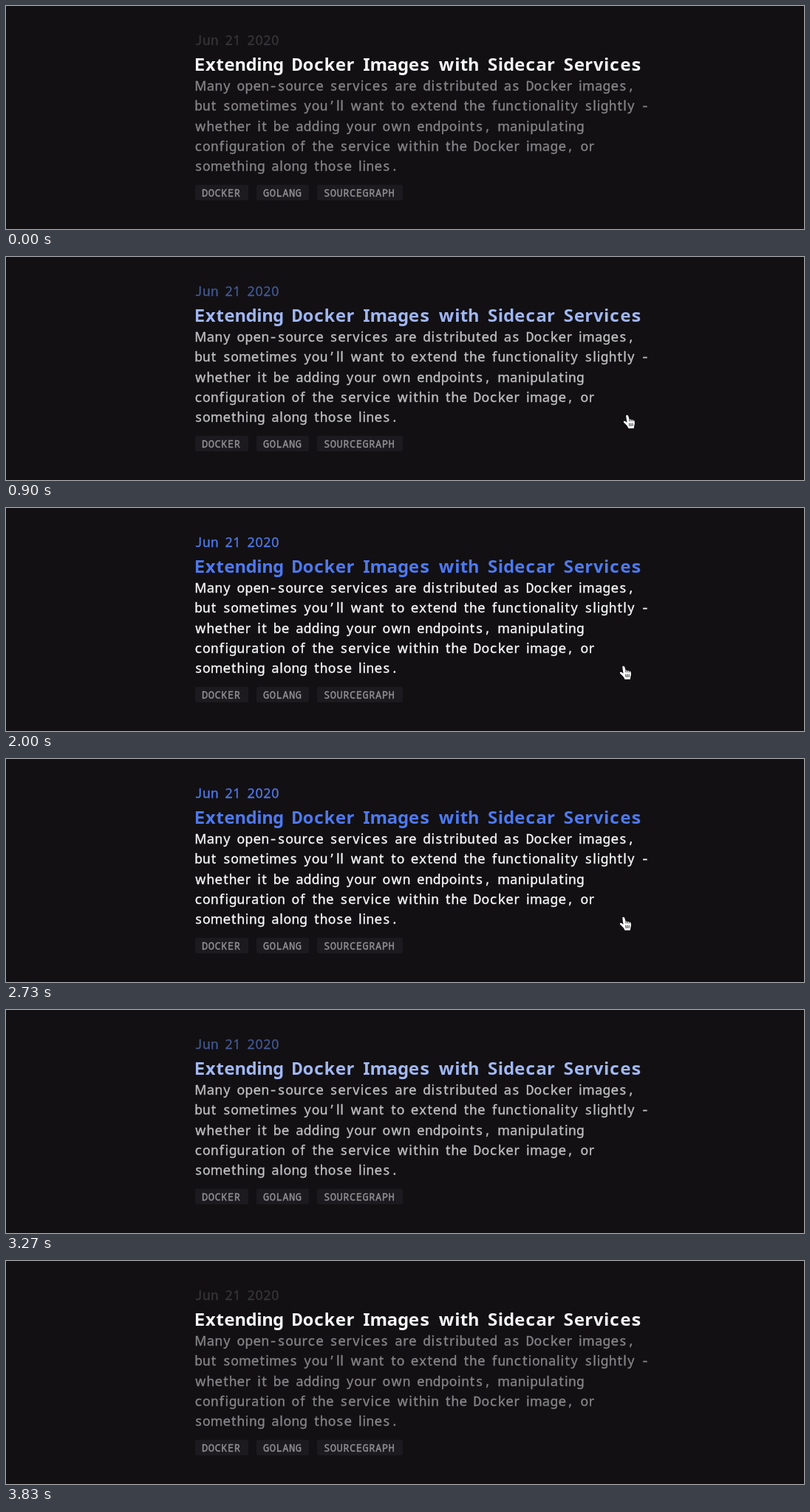
Write an HTML page that moves like this. It is 1080 by 303 pixels and loops after 4130 ms.

```html
<!DOCTYPE html>
<html lang="en">
<head>
<meta charset="utf-8">
<title>Post card hover</title>
<style>
html, body { margin: 0; width: 100%; height: 100%; overflow: hidden; background: #121013; }
svg { display: block; width: 100vw; height: 100vh; }
text { white-space: pre; text-anchor: middle; font-family: "Noto Sans Mono", "DejaVu Sans Mono", monospace; font-variant-ligatures: none; stroke: currentColor; fill: currentColor; stroke-width: .35px; }
text[font-weight="700"] { stroke: none; }
.prop { font-family: "Noto Sans", "Open Sans", sans-serif; }
</style>
</head>
<body>
<svg id="stage" viewBox="0 0 1080 303" xmlns="http://www.w3.org/2000/svg">
  <g id="card"></g>
  <g id="cursor">
    <path id="arrow" d="M.5 .1V16.2L4.1 12.8 6.7 18.9 9.5 17.7 7 11.8H12Z" fill="#0b0a0c" stroke="#fff" stroke-width="1.2" stroke-linejoin="round"/>
    <g id="hand" transform="translate(-.8 -.6)">
      <path d="M1 1.6Q1.3 0 2.9 .4Q3.8 .8 4.2 2.2L5.5 6.6Q6.6 5.6 7.9 6.8Q9.2 6 10.3 7.4Q11.8 6.8 12.4 8.6Q13.1 11 12.2 14L11.5 18.4H4.2Q3.6 15.8 1 13.4L-2.2 10.3Q-2.9 8.8-1.4 8.4Q0 8.4 2.3 10.6Z" fill="#fff"/>
      <path d="M5.4 11.3L5.9 15.6M7.7 11.2L7.9 15.6M10 11.2V15.4M5.5 6.6L6 9M7.9 6.8L8.2 9M10.3 7.4V9" fill="none" stroke="#17151a" stroke-width=".9"/>
    </g>
  </g>
</svg>
<script>
const LOOP = 4130, FADE = 500, ENTER = 750, LEAVE = 3125;
const SHOWN = [470, 3230];
const PATH = [
  [470, 926, 277], [530, 896, 219], [730, 890, 219], [750, 870, 219],
  [820, 849, 218], [900, 839, 215], [1000, 834, 215], [2730, 834, 215],
  [2950, 842, 224], [3130, 871, 256], [3230, 897, 298]
];
const COLORS = {
  date: [[54, 53, 56], [80, 120, 228]],
  title: [[247, 247, 248], [78, 121, 240]],
  body: [[133, 132, 135], [248, 248, 249]]
};

const $ = id => document.getElementById(id);
const card = $('card');

function add(parent, name, attrs, content = '') {
  const node = document.createElementNS('http://www.w3.org/2000/svg', name);
  for (const key in attrs) node.setAttribute(key, attrs[key]);
  node.textContent = content;
  return parent.appendChild(node);
}

// Semi-monospaced setting: four advance classes, each glyph centred in its cell.
const advance = c => /[il]/.test(c) ? .5 : /[ ftrI]/.test(c) ? .75 : /[mwM]/.test(c) ? 1.5 : 1;
const isProportional = c => /[ilftrmwMI0-9,.’]/.test(c);

function setLine(parent, str, x, y, cell, size, weight = 400) {
  const text = add(parent, 'text', { y, 'font-size': size, 'font-weight': weight });
  const runs = [];
  for (const c of str) {
    const prop = isProportional(c), width = advance(c) * cell;
    let run = runs[runs.length - 1];
    if (!run || run.prop !== prop) runs.push(run = { prop, chars: '', xs: [] });
    run.chars += c;
    run.xs.push((x + width / 2).toFixed(2));
    x += width;
  }
  for (const { prop, chars, xs } of runs)
    add(text, 'tspan', { x: xs.join(' '), class: prop ? 'prop' : 'mono' }, chars);
}

const groups = {};
for (const name in COLORS) groups[name] = add(card, 'g', {});

setLine(groups.date, 'Jun 21 2020', 255, 53.4, 10.94, 17.8);
setLine(groups.title, 'Extending Docker Images with Sidecar Services', 254.8, 88, 14.68, 24, 700);
[
  'Many open-source services are distributed as Docker images,',
  'but sometimes you’ll want to extend the functionality slightly -',
  'whether it be adding your own endpoints, manipulating',
  'configuration of the service within the Docker image, or',
  'something along those lines.'
].forEach((line, i) => setLine(groups.body, line, 255, 115.1 + 27.3 * i, 10.94, 17.8));

const tags = add(card, 'g', { color: '#929094' });
[['DOCKER', 256, 72], ['GOLANG', 339, 71], ['SOURCEGRAPH', 421, 116]].forEach(([label, x, width]) => {
  add(tags, 'rect', { x, y: 243, width, height: 21, rx: 2, fill: '#1c1a1e' });
  setLine(tags, label, x + 8.7, 258.9, 8.75, 13.8);
});

// CSS "ease": cubic-bezier(.25, .1, .25, 1)
function ease(p) {
  if (p <= 0) return 0;
  if (p >= 1) return 1;
  const bezier = (s, a, b) => 3 * a * s * (1 - s) ** 2 + 3 * b * s * s * (1 - s) + s ** 3;
  let low = 0, high = 1;
  for (let i = 0; i < 24; i++) {
    const mid = (low + high) / 2;
    if (bezier(mid, .25, .25) < p) low = mid; else high = mid;
  }
  return bezier(low, .1, 1);
}

function cursorAt(t) {
  const next = PATH.findIndex(key => key[0] > t);
  if (next < 1) return PATH[next < 0 ? PATH.length - 1 : 0].slice(1);
  const a = PATH[next - 1], b = PATH[next], p = (t - a[0]) / (b[0] - a[0]);
  return [1, 2].map(i => a[i] + (b[i] - a[i]) * p);
}

function render(t) {
  const hover = ease((t - ENTER) / FADE) - ease((t - LEAVE) / FADE);
  for (const name in COLORS) {
    const [off, on] = COLORS[name];
    groups[name].setAttribute('color', `rgb(${off.map((v, i) => Math.round(v + (on[i] - v) * hover))})`);
  }
  const inside = t >= ENTER && t < LEAVE;
  $('cursor').setAttribute('visibility', t >= SHOWN[0] && t < SHOWN[1] ? 'visible' : 'hidden');
  $('cursor').setAttribute('transform', `translate(${cursorAt(t)})`);
  $('hand').setAttribute('display', inside ? 'inline' : 'none');
  $('arrow').setAttribute('display', inside ? 'none' : 'inline');
}

const start = performance.now();
function tick() {
  render((performance.now() - start) % LOOP);
  requestAnimationFrame(tick);
}
tick();
</script>
</body>
</html>
```
